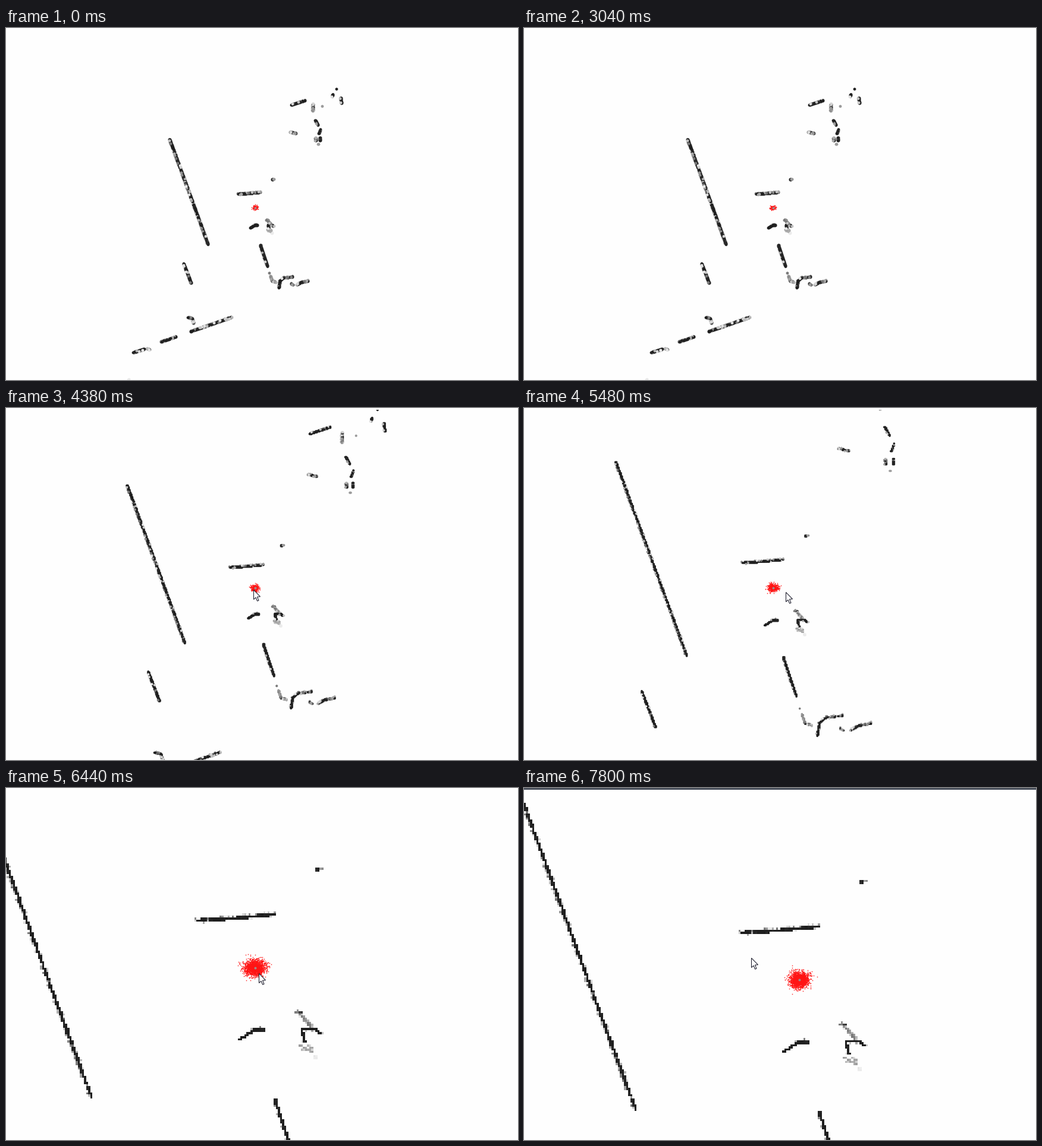
Animation of 861 by 593 pixels, one loop 8 s. Source, as a matplotlib script:

```python
import random

import matplotlib.pyplot as plt
import numpy as np
from matplotlib.animation import FuncAnimation
from matplotlib.patches import Polygon, Rectangle

W, H, DPI = 861, 593, 100
PX = 72 / DPI
FRAMES, DT = 160, 50
PAPER = "#fefefe"
CENTER = np.array([418.5, 302.5])

rng = random.Random(4)
cells = {}


def put(x, y, shade):
    key = (round(x), round(y))
    cells[key] = min(shade, cells.get(key, 1))


def wall(*pts, dark=0.93, fringe=0.35):
    """Dark occupied cells along a polyline, with a grey fringe beside it."""
    for (x0, y0), (x1, y1) in zip(pts, pts[1:]):
        n = max(2, int(np.hypot(x1 - x0, y1 - y0) * 1.5))
        dx, dy = (1, 0) if abs(y1 - y0) > abs(x1 - x0) else (0, 1)
        for x, y in zip(np.linspace(x0, x1, n), np.linspace(y0, y1, n)):
            solid = rng.random() < dark
            for side in (-0.25, 0.25):
                shade = rng.uniform(0.11, 0.16) if solid else rng.uniform(0.4, 0.9)
                put(x + side * dx, y + side * dy, shade)
            if rng.random() < fringe:
                put(x - dx, y - dy, rng.uniform(0.45, 0.93))
            if rng.random() < fringe / 4:
                put(x + dx, y + dy, rng.uniform(0.6, 0.93))


def blob(x, y, rx=0.5, ry=0.5, lo=0.12, hi=0.2):
    """Scattered cells around a point, one per unit of area."""
    for _ in range(max(2, int(9 * rx * ry))):
        put(x + rng.uniform(-rx, rx), y + rng.uniform(-ry, ry),
            rng.uniform(lo, hi))


# Left and bottom walls
wall((275.6, 188), (340, 364.6))
wall((299, 397), (311.7, 430))
wall((306, 488), (313, 489), (316, 498), dark=0.6)
wall((311, 511.5), (380, 487.5))
wall((261, 529), (286, 520.5), dark=0.75)
wall((214.5, 547), (233, 541))
wall((237, 540), (242, 542), dark=0, fringe=0.2)
blob(206.5, 592.5, lo=0.9, hi=0.95)

# Around the robot
wall((390, 279.8), (401, 279.6), (428, 277))
wall((411, 337), (418, 332.6), (423, 332.4), fringe=0.1)
blob(448.4, 255.8, 0.9, 0.9)
blob(450.6, 254.4, lo=0.5, hi=0.7)
wall((442.4, 338), (441, 332), (448, 332), (450, 334.4), fringe=0.1)
wall((439, 323), (446, 331), dark=0, fringe=0.8)
blob(440.3, 324.6, lo=0.2, hi=0.35)
blob(443, 341.5, 3, 1.5, 0.6, 0.93)
blob(447, 345.5, 1.2, 0.6, 0.9, 0.94)

# Lower right
wall((428.1, 365.5), (432.1, 378.4), (440, 401.7), fringe=0.2)
blob(443.2, 413.5, lo=0.4, hi=0.6)
wall((445, 418), (447.6, 426), dark=0, fringe=0)
wall((447.6, 426.7), (454, 428.3), dark=0.5)
wall((459, 438), (461.2, 426), (466.6, 421.3))
wall((466.6, 421.3), (482, 419.5), dark=0.5)
wall((479.6, 431), (483, 433.2), dark=0.3)
wall((489, 433.2), (496.5, 428.9), (508.4, 426.3), dark=0.6)

# Upper right
wall((480, 130), (503.3, 122.3))
wall((516.4, 128.5), (516.4, 140), dark=0.35)
wall((520.6, 156), (525, 164))
wall((529, 171), (528, 175), (526.4, 178), fringe=0.1)
for x in (521.5, 528.6):
    wall((x, 185), (x, 190.5), dark=0.5)
for x, y in ((532.5, 132), (525.5, 196)):
    blob(x, y, 0.4, 0.4, 0.6, 0.62)
wall((478.3, 175.5), (488.4, 177.8), dark=0.5)
wall((548.5, 116), (550.2, 111.5), dark=0.5, fringe=0)
blob(555.3, 102.6)
wall((563.4, 118.5), (564.5, 127))

# Light cells tend to be painted later, so they show on top when zoomed out
order = sorted(cells, key=lambda k: 0.4 * cells[k] + rng.random())
grid = np.array(order, float) - CENTER
shades = np.repeat([[cells[k]] for k in order], 3, axis=1)

# The screen refreshes in seven bursts of eight
starts = [130, 1280, 2330, 3450, 4500, 5630, 6680]
ends = [1130, 2210, 3300, 4380, 5480, 6560, 7650]
ticks = np.concatenate([[0], np.linspace(starts, ends, 8).T.ravel(), [7800]])

ZOOMS = [(3450, 3849, 1.5), (4500, 4640, 1.23), (5560, 6100, 1.9)]
MOVES = [(3160, 3450, (416, 306)), (4500, 4780, (440, 310)),
         (5630, 6430, (425, 312)), (6680, 7090, (338, 266))]
DRAG = np.array([44, 20.5])
ARROW = np.array([(0.5, 0.5), (0.5, 16.5), (4, 13.2), (6.6, 19.2), (9, 18.2),
                  (6.5, 12.2), (11.5, 11.8)])


def ease(t, t0, t1):
    u = np.clip((t - t0) / (t1 - t0), 0, 1)
    return u * u * (3 - 2 * u)


def zoom(t):
    return np.prod([f ** ease(t, t0, t1) for t0, t1, f in ZOOMS])


def pan(t):
    return DRAG * ease(t, 7090, 7800)


def pointer(t):
    tip = np.array([827.0, 527.0])
    for t0, t1, goal in MOVES:
        tip += (goal - tip) * ease(t, t0, t1)
    return np.round(tip + pan(t))


def particles(step, scale):
    """Pose estimates, drawn afresh at every refresh."""
    gen = np.random.default_rng(100 + step)
    n = int(110 * scale ** 2.2)
    spread = gen.uniform((2.2, 1.6), (2.6, 1.95))
    pts = gen.normal(size=(n, 2)) * spread
    reach = 3.5 + 2.5 * scale
    r = np.hypot(*pts.T)
    pts = pts[r < reach]
    return pts * scale


fig = plt.figure(figsize=(W / DPI, H / DPI), dpi=DPI, facecolor=PAPER)
ax = fig.add_axes([0, 0, 1, 1])
ax.set(xlim=(0, W), ylim=(H, 0))
ax.axis("off")

discs = ax.scatter(*grid.T, marker="o", c=shades, linewidths=0, zorder=1)
squares = ax.scatter(*grid.T, marker="s", c=shades, linewidths=0, zorder=1,
                     antialiased=False)
cloud, = ax.plot([], [], "s", color="#ff1414", ms=1.4 * PX, mew=0, zorder=2)
robot, = ax.plot([], [], "o", color="#a08a8a", ms=4 * PX, mew=0, zorder=3)
top = ax.add_patch(Rectangle((0, 0), W, 3, lw=0, zorder=4))
mouse = ax.add_patch(Polygon(ARROW, fc="white", ec="#1a1a2a", lw=0.75,
                             zorder=5))


def draw(i):
    step = np.searchsorted(ticks, i * DT + 40, side="right") - 1
    t = ticks[step]
    scale = zoom(t)
    origin = CENTER + pan(t)

    zoomed = scale > 2
    discs.set_visible(not zoomed)
    squares.set_visible(zoomed)
    shown = squares if zoomed else discs
    shown.set_offsets(origin + grid * scale)
    shown.set_sizes([(max(scale, 6.2 - 1.4 * scale) * PX) ** 2])

    cloud.set_data(*(origin + particles(step, scale)).T)
    robot.set_data(*origin[:, None])
    top.set_facecolor("#4a505c" if t > 7050 else PAPER)
    mouse.set_visible(t > 3100)
    mouse.set_xy(ARROW + pointer(t))
    return discs, squares, cloud, robot, top, mouse


anim = FuncAnimation(fig, draw, frames=FRAMES, interval=DT, repeat=True,
                     repeat_delay=0, cache_frame_data=False)
plt.show()
```
